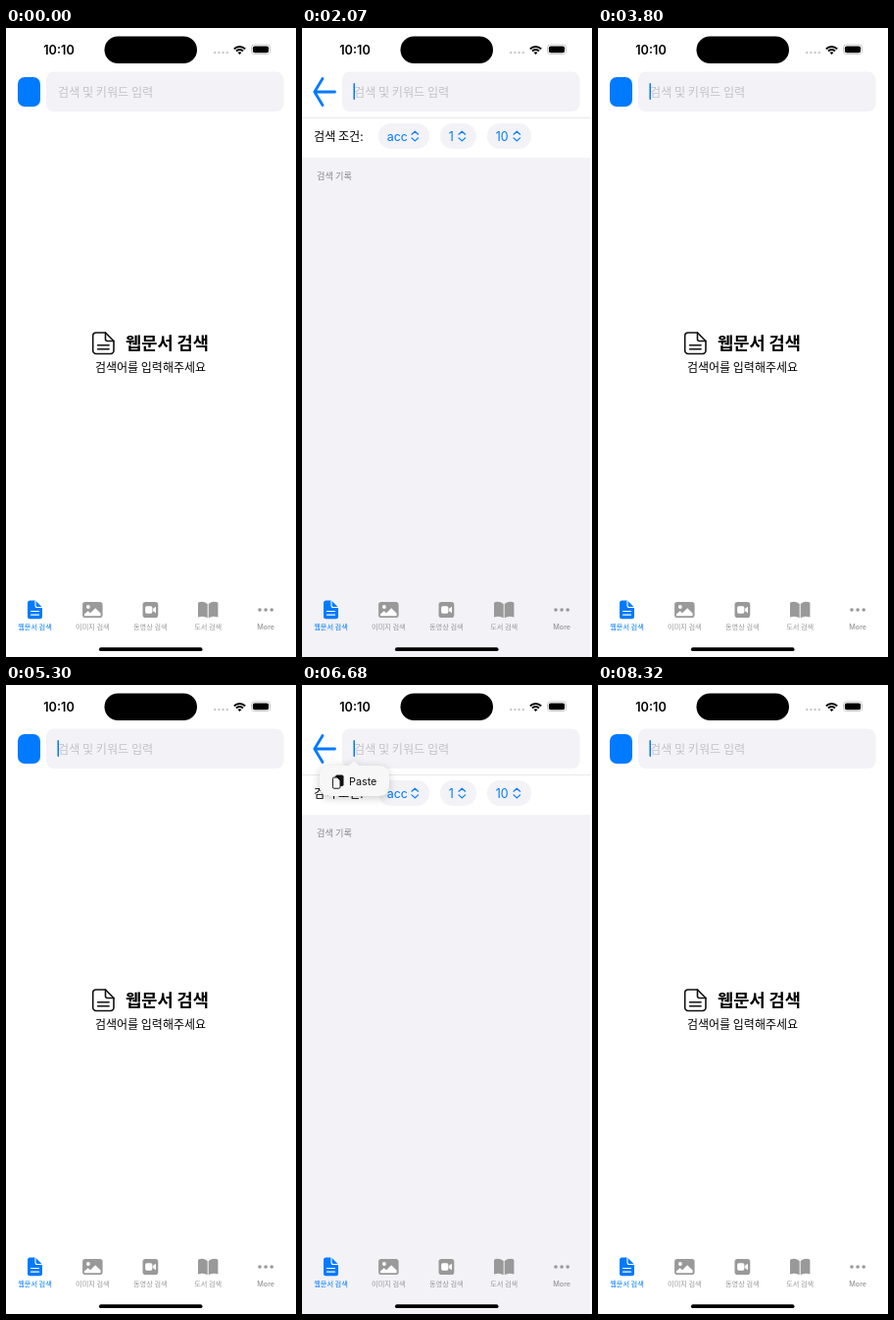
These frames come from a looping animation (296x640 px, 8410 ms). An HTML page:

```html
<!DOCTYPE html>
<html>
<head>
<meta charset="utf-8">
<title>Search screen</title>
<style>
  html, body { margin: 0; width: 100%; height: 100%; overflow: hidden; background: #fff; }
  svg { display: block; width: 100vw; height: 100vh; }
  text { font-family: "Noto Sans CJK KR", "Noto Sans CJK", sans-serif; }
  .latin { font-family: Inter, "Liberation Sans", sans-serif; }
  .blue { fill: #007aff; }
  .grey { fill: #999; }
  .pale { fill: #f2f2f7; }
  .white { fill: #fff; }
  .line { fill: none; stroke-linecap: round; stroke-linejoin: round; }
  .mid { text-anchor: middle; }
  .tab { font-size: 7.2px; font-weight: 500; }
  .shadow { fill: #f7f7f8; filter: drop-shadow(0 2px 4px rgba(0, 0, 0, .2)); }
</style>
</head>
<body>
<svg viewBox="0 0 296 640">
  <g id="home">
    <rect class="blue" x="12" y="50" width="23" height="30" rx="7"/>
    <g id="page" class="line" stroke="#111" stroke-width="1.6"></g>
    <text class="mid" x="164.500" y="326.500" font-size="17.6" font-weight="700">웹문서 검색</text>
    <text class="mid" x="147.500" y="350.300" font-size="12">검색어를 입력해주세요</text>
  </g>

  <g id="search">
    <path class="line" d="M33.500 65H13M21 51.500L12.800 65L21 78.500" stroke="#007aff" stroke-width="2.800"/>
    <rect y="91" width="294" height="1" fill="#e9e9ec"/>
    <rect class="pale" y="132" width="294" height="508"/>
    <text x="12" y="115.200" font-size="12.1">검색 조건:</text>
    <text x="15" y="153.900" font-size="9.2" fill="#8a8a8e">검색 기록</text>
    <g id="chips"></g>
  </g>

  <rect class="pale" x="41" y="44.500" width="242.500" height="40.500" rx="8"/>
  <text x="53" y="70" font-size="12.1" fill="#c4c4c7">검색 및 키워드 입력</text>
  <rect id="caret" class="blue" x="52.500" y="56" width="1.500" height="17" rx=".7"/>

  <g id="popup">
    <g class="shadow">
      <rect x="18" y="82" width="71" height="31" rx="9.500"/>
      <path d="M47 82.500L53 77.500L59 82.500Z"/>
    </g>
    <rect x="34" y="91.500" width="8.500" height="11.500" rx="1.800" fill="#111"/>
    <g id="sheet" stroke="#111" fill="#f7f7f8"></g>
    <text class="latin" x="48" y="102" font-size="10.8" fill="#111">Paste</text>
  </g>

  <text class="latin mid" x="54" y="26.600" font-size="12.7" font-weight="600">10:10</text>
  <rect x="100.500" y="8.500" width="94.500" height="27.500" rx="13.700"/>
  <g id="signal"></g>
  <rect x="250.500" y="17" width="19" height="9.600" rx="3" fill="none" stroke="#bbb" stroke-width=".8"/>
  <rect x="251.900" y="18.400" width="16.200" height="6.800" rx="1.900"/>

  <g id="tabs"></g>
  <rect x="95" y="630.300" width="105.500" height="3.700" rx="1.850"/>
</svg>

<script>
const LOOP = 8410;
const $ = id => document.getElementById(id);
const repeat = (n, part) => Array.from({ length: n }, (_, i) => part(i)).join("");
const dot = (x, y, r) => `<circle cx="${x}" cy="${y}" r="${r}"/>`;
const box = (x, y, w, h, r, cls) =>
  `<rect class="${cls}" x="${x}" y="${y}" width="${w}" height="${h}" rx="${r}"/>`;

// Sheet of paper with a cut corner of size c
function paper(x, y, w, h, c, r) {
  const turn = (dx, dy) => `a${r} ${r} 0 0 1 ${dx} ${dy}`;
  return `<path d="M${x + r} ${y}h${w - r - c}l${c} ${c}v${h - c - r}${turn(-r, r)}
    h${2 * r - w}${turn(-r, -r)}v${2 * r - h}${turn(r, -r)}z"/>`;
}
const fold = (x, y, w, c) => `<path d="M${x + w - c} ${y}v${c - 2}q0 2 2 2h${c - 2}"/>`;
const rows = (x, y, w, h) =>
  repeat(2, i => `<path d="M${x + w * .23} ${y + h * (.59 + .19 * i)}h${w * .54}"/>`);

$("page").innerHTML = paper(88.7, 310, 21.3, 21.5, 8.5, 3.3) + fold(88.7, 310, 21.3, 8.5) + rows(88.7, 310, 21.3, 21.5);
$("sheet").innerHTML = paper(31.4, 94, 7.6, 11.2, 3, 1.4);

// Option chips: label, left edge, width
$("chips").innerHTML = [["acc", 78, 52], ["1", 141, 37], ["10", 189, 45]].map(([label, x, w]) => `
  ${box(x, 97, w, 26, 13, "pale")}
  <text class="blue latin" x="${x + 8.8}" y="114.500" font-size="12.4">${label}</text>
  <path class="line" stroke="#007aff" stroke-width="1.200"
    d="M${x + w - 18} 108.200l3.300 -3l3.300 3m-6.600 3.700l3.300 3l3.300 -3"/>`).join("");

// Signal dots and Wi-Fi arcs
const arc = r => {
  const d = r * Math.SQRT1_2;
  return `M${238.5 - d} ${27 - d}a${r} ${r} 0 0 1 ${2 * d} 0`;
};
$("signal").innerHTML =
  `<g fill="#c9c9cb">${repeat(4, i => dot(213.3 + 4.15 * i, 25, 1.2))}</g>` +
  `<path d="${arc(8)}${arc(4.9)}" fill="none" stroke="#000" stroke-width="2"/>` +
  `<path d="${arc(2.7)}L238.500 27z"/>`;

// Tab bar: label and icon drawn around x = 0
const leaf = side => `<path class="grey" transform="scale(${side} 1)"
  d="M.5 586q2.700 -2.200 6.200 -2.200q3.500 .2 3.500 1.700v14q-5.500 -1.900 -9.700 .7z"/>`;
const tabs = [
  ["웹문서 검색", `<g class="blue">${paper(-7.5, 582.5, 15, 18.7, 7, 2.5)}</g>
    <g class="line" stroke="#fff" stroke-width="1.100">
      ${fold(-7.5, 582.5, 15, 7)}${rows(-7.5, 582.5, 15, 18.7)}</g>`],
  ["이미지 검색", box(-10.3, 584, 20.5, 16, 2.8, "grey") +
    `<g class="white">${dot(-4.5, 589, 1.9)}
      <path d="M-8.500 598.300v-1.800l3.700 -3.300l2.500 2.100l5.100 -5l5.400 5.200v2.800z"/></g>`],
  ["동영상 검색", box(-7.8, 584, 15.8, 16, 2.8, "grey") + box(-5.2, 588.3, 7.3, 7.4, 1.6, "white") +
    `<path class="white" d="M2.800 590.800l2.900 -2.100v6.600l-2.900 -2.100z"/>`],
  ["도서 검색", leaf(-1) + leaf(1)],
  ["More", `<g class="grey">${repeat(3, i => dot(6.1 * (i - 1), 592, 1.8))}</g>`]
];
$("tabs").innerHTML = tabs.map(([label, icon], i) => `
  <g transform="translate(${29.5 + 58.9 * i} 0)">${icon}
    <text class="tab mid ${i ? "grey" : "blue"} ${label === "More" ? "latin" : ""}" y="611.600">${label}</text>
  </g>`).join("");

// Visits to the search screen, each with one paste menu
const visits = [
  { enter: 600, leave: 3800, open: 980, close: 1840 },
  { enter: 5840, leave: 7330, open: 6330, close: 7330 }
];
// The caret starts a fresh blink at each of these times
const wakes = [180, 600, 980, 1840, 2380, 4270, 6330, 7290];
const BLINK = 1020, SOLID = 560, FADE = 110;
const MENU = 230;

const clamp = v => Math.min(1, Math.max(0, v));
const easeOut = p => 1 - (1 - clamp(p)) ** 3;

function caretAlpha(t) {
  const wake = wakes.filter(w => w <= t).pop();
  if (wake === undefined) return 0;
  const phase = (t - wake) % BLINK;
  const out = 1 - (phase - SOLID) / FADE;
  const back = 1 - (BLINK - phase) / FADE;
  return clamp(Math.max(out, back));
}

function draw(t) {
  const searching = visits.some(v => t >= v.enter && t < v.leave);
  $("home").style.display = searching ? "none" : "";
  $("search").style.display = searching ? "" : "none";
  $("caret").setAttribute("opacity", caretAlpha(t));

  const menu = visits.find(v => t >= v.open && t < v.close + MENU);
  $("popup").style.display = menu ? "" : "none";
  if (menu) {
    const grow = easeOut((t - menu.open) / MENU);
    const gone = clamp((t - menu.close) / MENU);
    $("popup").setAttribute("opacity", (.8 + .2 * grow) * (1 - gone));
    $("popup").setAttribute("transform", `translate(53 78) scale(${.78 + .22 * grow}) translate(-53 -78)`);
  }
}

const begin = performance.now();
function tick() {
  draw((performance.now() - begin) % LOOP);
  requestAnimationFrame(tick);
}
tick();
</script>
</body>
</html>
```
